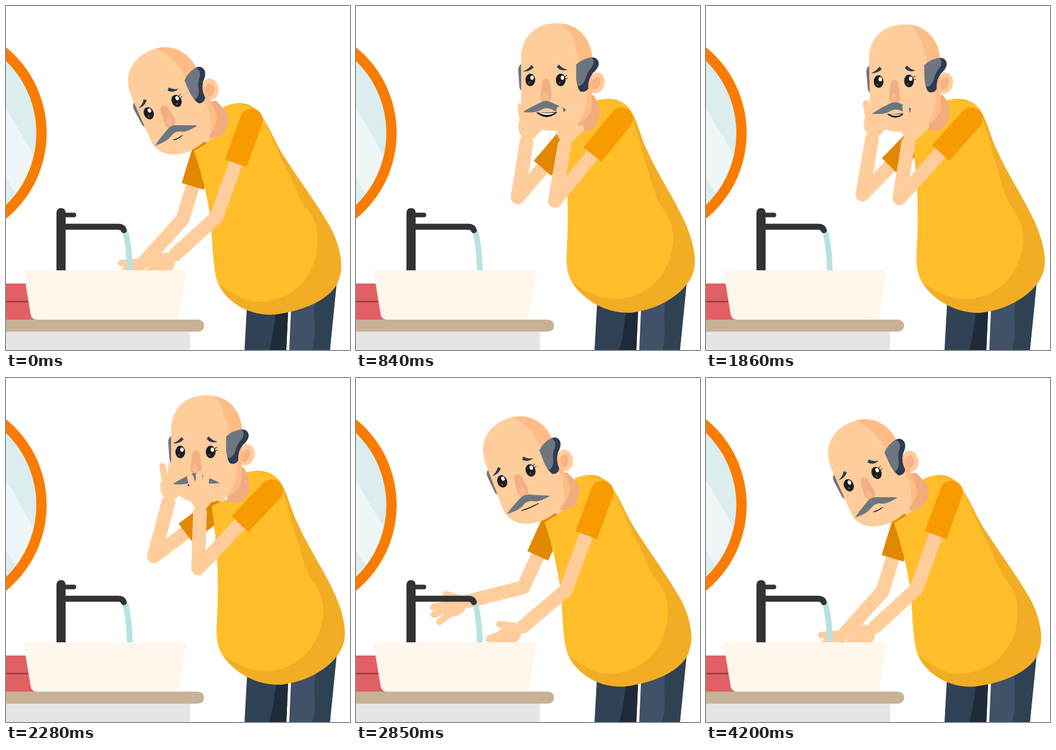
Recreate the animation shown at these times as an HTML page with a canvas. Size 600x600 px, loop 4230 ms.

```html
<!DOCTYPE html>
<html lang="en">
<head>
<meta charset="utf-8">
<title>Washing face</title>
<style>
html, body { margin: 0; width: 100%; height: 100%; overflow: hidden; background: #fff; }
canvas { display: block; width: 100vmin; height: 100vmin; }
</style>
</head>
<body>
<canvas id="stage" width="600" height="600"></canvas>
<script>
const ctx = document.getElementById('stage').getContext('2d');
const LOOP = 4230, RAD = Math.PI / 180, FOREARM = 98, SLEEVE = 80;
const SKIN = '#ffcd9c', SHADE = '#ffbc84', DEEP = '#f1ac80', NAVY = '#2f3b50', GREY = '#6d7680';

// Far elbow x, y, forearm angle, hand angle; then the same for the near arm.
const poses = {
  washA: [308, 372, 132, 151, 367, 368, 137.5, 150],
  washB: [302, 370, 130.5, 158, 355, 370, 131, 154],
  reach: [274, 352, 171, 180, 362, 362, 165, 185],
  dip:   [292, 365, 166, 172, 366, 370, 139.5, 162],
  lift:  [264, 335, 252, 262, 345, 350, 245, 262],
  rubA:  [282, 334, 279, 288, 347, 340, 279.7, 290],
  rubB:  [268, 326, 280, 288, 332, 333, 278.7, 295],
  low:   [258, 311, 285, 288, 335, 332, 272, 282]
};
// time, uprightness, mouth, pose
const keys = [
  [0, 0, 0, 'washA'], [120, .04, .3, 'washB'], [400, .42, .8, 'reach'], [570, .72, .9, 'lift'],
  [840, 1, 1, 'rubA'], [1100, 1.09, 1, 'rubA'], [1410, .83, .4, 'rubB'], [1700, 1.1, 1, 'rubA'],
  [1970, .87, .4, 'rubB'], [2160, 1.09, .8, 'rubB'], [2280, 1, .8, 'low'], [2500, .8, .9, 'lift'],
  [2715, .4, .9, 'reach'], [2850, .12, .8, 'dip'], [3270, 0, .5, 'washA'], [3600, 0, .5, 'washB'],
  [3880, 0, .2, 'washA'], [4040, 0, .1, 'washB'], [4200, 0, 0, 'washA'], [LOOP, 0, 0, 'washA']
].map(([t, p, m, name]) => ({ t, v: [p, m, ...poses[name]] }));

function slope(i, c) {
  if (i < 1 || i > keys.length - 2) return 0;
  const [a, b, d] = [keys[i - 1], keys[i], keys[i + 1]];
  const s = (b.v[c] - a.v[c]) / (b.t - a.t), r = (d.v[c] - b.v[c]) / (d.t - b.t);
  return s * r <= 0 ? 0 : 2 * s * r / (s + r);
}

function sample(t) {
  let i = 0;
  while (i < keys.length - 2 && keys[i + 1].t <= t) i++;
  const a = keys[i], b = keys[i + 1], h = b.t - a.t, u = (t - a.t) / h;
  const e = u * u * (3 - 2 * u);
  return a.v.map((y, c) => y + (b.v[c] - y) * e
    + h * u * (1 - u) * ((1 - u) * slope(i, c) - u * slope(i + 1, c)));
}

const number = /\d+(\.\d+)?/g;
function blend(a, b, p) {
  const to = b.match(number);
  let i = 0;
  return new Path2D(a.replace(number, n => +n + (to[i++] - n) * p));
}

function fill(shape, color) {
  ctx.fillStyle = color;
  ctx.fill(typeof shape === 'string' ? new Path2D(shape) : shape);
}

function line(d, color, width, cap = 'round') {
  ctx.strokeStyle = color;
  ctx.lineWidth = width;
  ctx.lineCap = cap;
  ctx.lineJoin = 'round';
  ctx.stroke(new Path2D(d));
}

function oval(x, y, rx, ry, color, turn = 0) {
  ctx.fillStyle = color;
  ctx.beginPath();
  ctx.ellipse(x, y, rx, ry, turn, 0, 7);
  ctx.fill();
}

function clipped(shape, draw) {
  ctx.save();
  ctx.clip(shape);
  draw();
  ctx.restore();
}

function mirror() {
  oval(-122, 221.5, 184, 184, '#dcedee');
  const glass = new Path2D();
  glass.arc(-122, 221.5, 184, 0, 7);
  clipped(glass, () => fill('M0 178L62 284L40 364L0 300Z', '#eef6f7'));
  ctx.strokeStyle = '#f97c00';
  ctx.lineWidth = 18;
  ctx.stroke(glass);
}

function sink() {
  fill('M0 484H60V547H0Z', '#e06063');
  line('M0 515.5H60', '#8a3036', 2, 'butt');
  fill('M88 461V361Q88 352.500 96 352.500Q104 352.500 104 361V461Z', '#333');
  line('M98 364.500H118.500', '#333', 8);
  line('M208 393Q215 420 216 463', '#b7e2e3', 10, 'butt');
  line('M104 385H195Q204 385 205.500 391', '#333', 10.5);
  fill('M31 465Q31 461 35 461H310Q314 461 314 465L303 536Q301 547 292 547H54Q45 547 43 538Z', '#fff7eb');
  fill('M0 568H321V600H0Z', '#e5e5e5');
  fill('M0 547H335Q345.500 548 345.500 557.500Q345.500 567 335 568H0Z', '#c7b297');
}

function legs() {
  fill('M421 510L493 510L489 600L416 600Z', '#304255');
  fill('M474 510L493 510L489 600L459 600C467 575 468 550 474 510Z', '#1f2b38');
  fill('M498 510L578 470L565 600L494 600Z', '#405168');
  fill('M545 490L578 470L565 600L534 600C545 565 530 540 545 490Z', '#2f4254');
}

function hand(x, y, angle) {
  ctx.save();
  ctx.translate(x, y);
  ctx.rotate(angle * RAD);
  line('M26 1L63 -2M28 -7L64 -15M28 -14L56 -29M14 6L38 17', SKIN, 11.5);
  oval(28, -6, 23, 17, SKIN, -.15);
  ctx.restore();
}

function arm(sx, sy, [ex, ey, bend, turn], color, rounded) {
  const wx = ex + FOREARM * Math.cos(bend * RAD), wy = ey + FOREARM * Math.sin(bend * RAD);
  line(`M${sx} ${sy}L${ex} ${ey}L${wx} ${wy}`, SKIN, 24);
  hand(wx, wy, turn);
  const k = SLEEVE / Math.hypot(ex - sx, ey - sy);
  if (rounded) oval(sx, sy, 20, 20, color);
  line(`M${sx} ${sy}L${sx + (ex - sx) * k} ${sy + (ey - sy) * k}`, color, 40, 'butt');
}

function torso(p) {
  const shirt = blend(
    'M380 176Q415 160 438 182C458 204 468 237 486 264C513 306 546 350 567 388C585 423 588 456 582 472C576 504 532 530 470 538C425 542 386 517 371 486C361 465 361 420 357 370Q348 310 328 253Q350 240 362 230Z',
    'M414 166Q455 154 475 177C490 195 495 225 507 250C525 292 555 335 575 380C592 420 594 450 588 465C580 492 540 528 480 535C435 537 400 512 384 492C366 470 367 450 368 420Q374 330 359 224Q372 215 392 212Z', p);
  const front = blend(
    'M330 150L440 180C460 215 470 250 492 290C505 315 510 335 522 350C545 378 544 395 543 420C538 470 505 513 440 516Q410 515 374 486L300 480L300 200Z',
    'M350 150L470 168C485 195 495 240 510 290C520 325 525 340 538 358C553 380 554 400 553 415C545 470 510 508 455 511Q420 512 380 484L320 480L320 200Z', p);
  fill(shirt, '#f2ad24');
  clipped(shirt, () => fill(front, '#ffbe2a'));
  fill(blend(
    'M348 168L366 165Q380 178 388 190Q390 205 380 222Q368 232 355 231Z',
    'M385 160L413 155Q423 165 425 190Q422 205 414 213Q400 220 386 216Z', p), DEEP);
}

function eye(x, y) {
  oval(x, y, 8.5, 11, '#1d1d1f');
  oval(x + 3, y - 4, 3, 3.8, '#fff');
  oval(x - 2, y + 5, 1.4, 1.6, '#6b6255');
}

function mouth(y, w, open) {
  ctx.save();
  ctx.translate(333, y);
  const d = `M${-w} 0Q0 ${1 + open} ${w} -1Q0 ${2 + 13 * open} ${-w} 0Z`;
  fill(d, '#17171a');
  line(d, '#17171a', 1);
  if (open > .25) fill(`M${3 - w} 0Q0 ${1 + open} ${w - 3} 0Q0 ${1 + 7 * open} ${3 - w} 0Z`, '#fff');
  ctx.restore();
}

function head(p, smile) {
  ctx.save();
  ctx.translate(314.75 + 60.5 * p, 159.5 - 29 * p);
  ctx.rotate(-24 * (1 - p) * RAD);
  ctx.translate(-375.25, -130.5);

  fill('M290 101Q283 102 283 112L285 142Q287 150 292 147Z', GREY);
  oval(419, 134, 14.5, 18.5, SKIN, .25);
  oval(418, 135, 7.5, 11.5, '#f6b386', .45);
  const skull = new Path2D('M288 92C288 52 314 30 350 30C386 30 412 56 412 95L411 176C408 202 372 218 345 218C308 218 288 198 288 175Z');
  fill(skull, SKIN);
  clipped(skull, () => fill('M354 26C380 42 387 78 390 110L403 150C403 180 395 205 368 222H420V26Z', SHADE));
  fill('M388 99Q415 83 422 95Q427 105 413 117Q404 128 405 144Q400 152 391 149Q386 144 385 130Z', NAVY);
  fill('M384 102Q396 91 411 90Q418 97 411 107Q403 115 400 128Q396 138 388 140Q384 134 384 125Z', GREY);

  fill('M325 131Q331 122 338 131L341 155Q341 168 331 168Q321 168 322 155Z', '#f3af82');
  oval(330, 157, 5, 7, '#f7ba8f');
  eye(304, 129);
  eye(357, 129);
  line('M364 123L368 121M365 127L369 126', '#1d1d1f', 1);
  fill('M291 114Q300 111 306 103L310 107Q303 115 291 114Z', NAVY);
  fill('M350 106L354 102Q359 109 369 111Q357 115 350 106Z', NAVY);
  const open = Math.max(0, Math.min(1, (p - .15) * 1.3)) * (.4 + .6 * smile);
  mouth(189 - 3 * p, 9 + 9 * smile, open);
  fill('M291 185C305 176 318 170 322 168Q331 163 341 168C352 174 362 177 373 183C360 185 347 185 341 180Q332 176 323 181C315 186 305 186 291 185Z', GREY);
  ctx.restore();
}

function draw(t) {
  const [p, smile, ...joints] = sample(t);
  // The body eases behind the head.
  const b = p < 1 ? p * p * (3 - 2 * p) : p;
  ctx.fillStyle = '#fff';
  ctx.fillRect(0, 0, 600, 600);
  mirror();
  legs();
  arm(349 + 28 * b, 238 - 16 * b, joints.slice(0, 4), '#e28700', false);
  torso(b);
  head(p, smile);
  arm(428 + 35 * b, 199 - 2 * b, joints.slice(4), '#f89b00', true);
  sink();
}

const start = performance.now();
function tick() {
  draw((performance.now() - start) % LOOP);
  requestAnimationFrame(tick);
}
tick();
</script>
</body>
</html>
```
